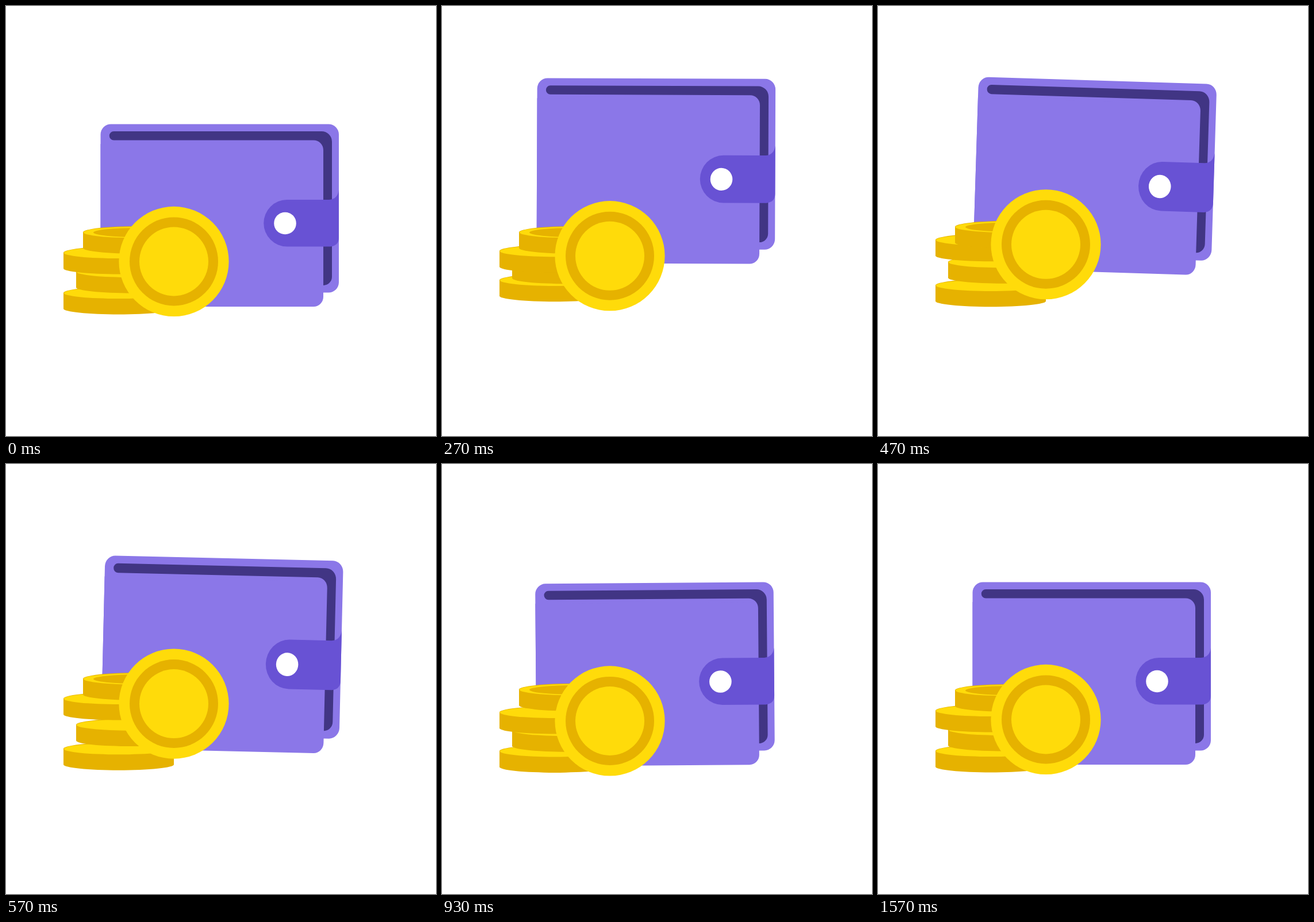
An HTML page with a canvas that plays this animation: 748x748 px, repeating every 1.61 s.

```html
<!DOCTYPE html>
<html lang="en">
<head>
<meta charset="utf-8">
<title>Wallet and coins</title>
<style>
  html, body { margin: 0; width: 100%; height: 100%; overflow: hidden; background: #fff; }
  canvas { display: block; width: 748px; height: 748px; }
</style>
</head>
<body>
<canvas id="stage" width="748" height="748"></canvas>
<script>
const ctx = document.getElementById('stage').getContext('2d');
const LOOP = 1610, STEP = 100 / 3;
const GOLD = '#ffdb0a', OCHRE = '#e6b200';
const PURPLE = '#8b77e8', STRAP = '#6852d4', GROOVE = '#413584';

// Keys are [time, value]; the value eases in and out between them.
function track(keys, t) {
  if (t <= keys[0][0]) return keys[0][1];
  for (let i = 1; i < keys.length; i++) {
    const [t0, v0] = keys[i - 1], [t1, v1] = keys[i];
    if (t < t1) {
      const p = (t - t0) / (t1 - t0);
      return v0 + (v1 - v0) * p * p * (3 - 2 * p);
    }
  }
  return keys[keys.length - 1][1];
}

const wallet = {
  y: [[0, 523], [333, 440], [675, 523], [770, 525], [900, 523]],
  stretch: [[130, 1], [560, 1.056], [860, 1]],
  tilt: [[205, 0], [500, 1.85], [790, -1.95], [1030, 0.4], [1270, 0]]
};
const frontLift = [[130, 0], [490, 30], [925, -2.5], [1170, 0]];
const hop = amp => [[0, 0], [300, amp], [700, -3], [1000, 0]];
const stack = [
  { x: 196, y: 499, delay: 0, lift: hop(23) },
  { x: 218, y: 462, delay: 60, lift: hop(21) },
  { x: 196, y: 429, delay: 200, lift: hop(23) },
  { x: 230, y: 393.5, delay: 335, lift: hop(23), hollow: true }
];

function fill(color, trace) {
  ctx.fillStyle = color;
  ctx.beginPath();
  trace();
  ctx.fill();
}
const ellipse = (color, x, y, rx, ry = rx) =>
  fill(color, () => ctx.ellipse(x, y, rx, ry, 0, 0, Math.PI * 2));

function drawWallet(t) {
  ctx.save();
  ctx.translate(552, track(wallet.y, t));
  ctx.rotate(track(wallet.tilt, t) * Math.PI / 180);
  ctx.scale(1, track(wallet.stretch, t));
  ctx.translate(-552, -523);

  fill(PURPLE, () => ctx.roundRect(164.5, 205.5, 414.5, 293, 18));
  fill(PURPLE, () => ctx.roundRect(164.5, 240, 387.5, 283, [0, 0, 17, 17]));

  fill(GROOVE, () => {
    ctx.moveTo(187.5, 218);
    ctx.arcTo(567, 218, 567, 236, 18);
    ctx.lineTo(567, 470);
    ctx.arcTo(567, 486, 552, 486, 15);
    ctx.lineTo(552, 486);
    ctx.arcTo(552, 233.5, 530, 233.5, 17);
    ctx.lineTo(187.5, 233.5);
    ctx.arc(187.5, 225.75, 7.75, Math.PI / 2, Math.PI * 1.5);
  });

  fill(STRAP, () => {
    ctx.moveTo(579, 320);
    ctx.quadraticCurveTo(577, 336, 562, 337);
    ctx.lineTo(489, 337);
    ctx.arc(489, 377.75, 40.75, Math.PI * 1.5, Math.PI / 2, true);
    ctx.lineTo(564, 418.5);
    ctx.quadraticCurveTo(579, 417, 579, 403);
  });
  ellipse('#fff', 485.5, 378, 19.3);
  ctx.restore();
}

function drawFlatCoin(coin, t) {
  const y = coin.y - track(coin.lift, t - coin.delay);
  fill(OCHRE, () => {
    ctx.ellipse(coin.x, y, 96, 10.5, 0, Math.PI, 0);
    ctx.ellipse(coin.x, y + 27.5, 96, 10, 0, 0, Math.PI);
  });
  ellipse(GOLD, coin.x, y + 0.3, 95.3, 9.8);
  if (coin.hollow) ellipse(OCHRE, coin.x, y + 0.5, 78, 8);
}

function drawFrontCoin(t) {
  const y = 444.4 - track(frontLift, t);
  ellipse(GOLD, 292, y, 95.6);
  ellipse(OCHRE, 292, y, 77);
  ellipse(GOLD, 292, y, 60);
}

function draw(now) {
  const frame = Math.min(47, Math.floor((now % LOOP + 3.4) / STEP));
  const t = frame * STEP;
  ctx.fillStyle = '#fff';
  ctx.fillRect(0, 0, 748, 748);
  drawWallet(t);
  for (const coin of stack) drawFlatCoin(coin, t);
  drawFrontCoin(t);
}

let start;
function tick(now) {
  start ??= now;
  draw(now - start);
  requestAnimationFrame(tick);
}
draw(0);
requestAnimationFrame(tick);
</script>
</body>
</html>
```
